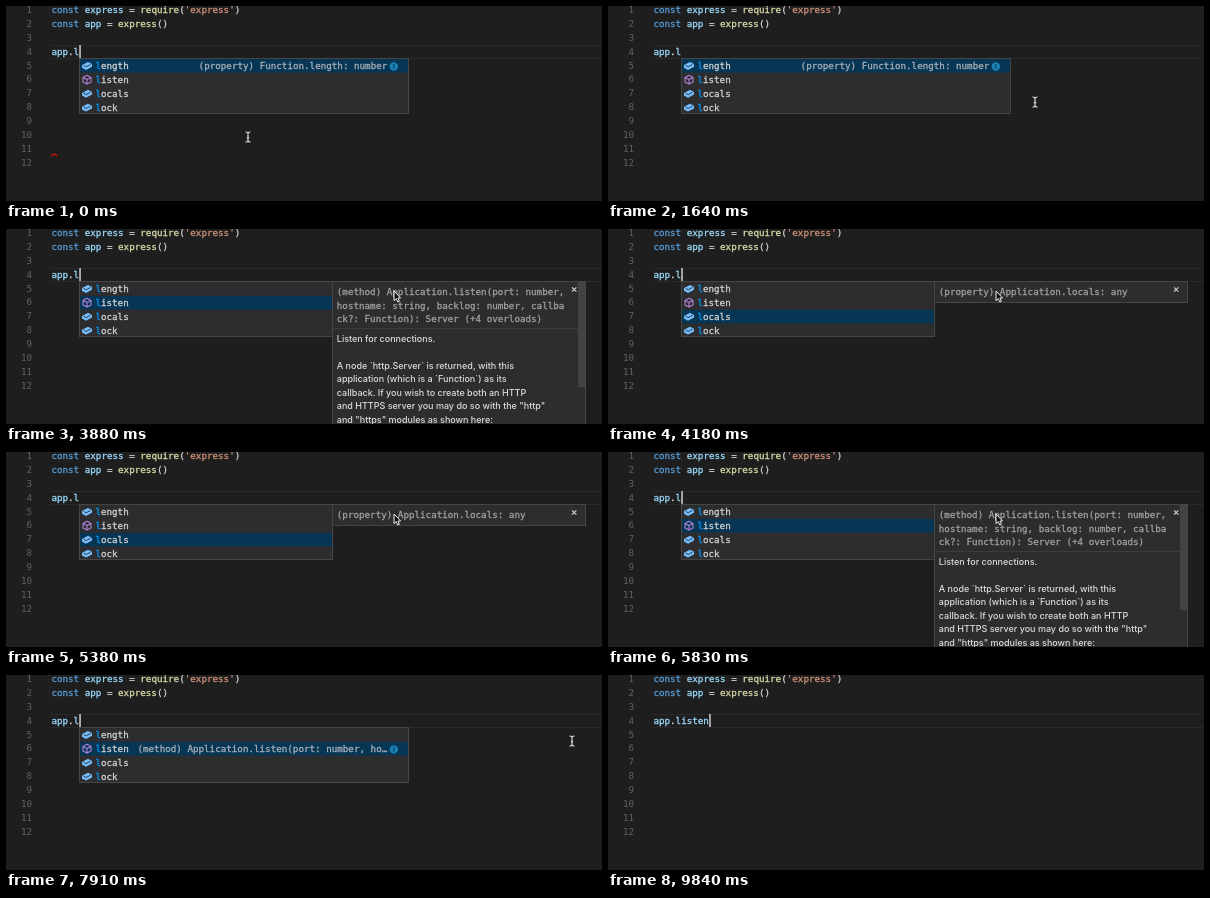
Recreate the animation shown at these times as an HTML page. Size 596 px wide and 195 px high, loop 9980 ms.

```html
<!DOCTYPE html>
<html lang="en">
<head>
<meta charset="utf-8">
<title>Editor suggestions</title>
<style>
  html, body { margin: 0; width: 100%; height: 100%; overflow: hidden; background: #1e1e1e; }
  svg { display: block; }
  text { white-space: pre; }
  .mono { font: 9.23px "DejaVu Sans Mono", monospace; }
  .code { stroke-width: .28px; }
  .sans { font: 500 9px Inter, sans-serif; }
</style>
</head>
<body>
<svg id="stage" width="596" height="195" viewBox="0 0 596 195"></svg>
<script>
const LOOP = 9980, CHAR = 5.556, LINE = 13.85, ROW = 13.9;
const stage = document.getElementById('stage');

const rect = (x, y, w, h, fill, extra = '') =>
  `<rect x="${x}" y="${y}" width="${w}" height="${h}" fill="${fill}" ${extra}/>`;
const path = (d, fill, stroke = 'none', width = 1) =>
  `<path d="${d}" fill="${fill}" stroke="${stroke}" stroke-width="${width}" stroke-linejoin="round"/>`;
const mono = (x, y, str, color) =>
  `<text class="mono code" x="${x}" y="${y}" fill="${color}" stroke="${color}">${str}</text>`;
const sans = (x, y, str) => `<text class="sans" x="${x}" y="${y}" fill="#dcdcdc">${str}</text>`;

// Consecutive [text, color] runs on the character grid.
function runs(x, y, parts) {
  return parts.map(([str, color]) => {
    const out = mono(x, y, str, color);
    x += str.length * CHAR;
    return out;
  }).join('');
}

const blue = '#569cd6', pale = '#9cdcfe', yellow = '#dcdcaa', plain = '#d4d4d4';
const baseline = n => 7.2 + LINE * (n - 1);

const items = [
  { name: 'length', info: '(property) Function.length: number' },
  { name: 'listen', info: '(method) Application.listen(port: number, ho…', method: true },
  { name: 'locals', info: '(property) Application.locals: any' },
  { name: 'lock', info: '(method) Application.lock(path: string)' }
];
const signature = [
  '(method) Application.listen(port: number,',
  'hostname: string, backlog: number, callba',
  'ck?: Function): Server (+4 overloads)'
];
const docs = [
  'A node `http.Server` is returned, with this',
  'application (which is a `Function`) as its',
  'callback. If you wish to create both an HTTP',
  'and HTTPS server you may do so with the "http"',
  'and "https" modules as shown here:'
];

// Caret flips at each of these times, starting visible.
const blinks = [450, 900, 1350, 1940, 2380, 2830, 3430, 3880, 4330, 4930, 5380,
  5830, 6280, 6870, 7310, 7910, 8360, 8810, 9400, 9840];
// [start time, selected row]
const picks = [[0, 0], [600, 1], [1050, 0], [3580, 1], [4180, 2], [4930, 3], [5380, 2], [5830, 1]];
const OPEN = 2530, CLOSE = 7460, ACCEPT = 8360;

const selected = t => picks.filter(p => p[0] <= t).pop()[1];
const caretOn = t => blinks.filter(b => b <= t).length % 2 === 0;
const tick = (t, start) => Math.floor((t - start + 5) / 147);

const approach = [[300, 138], [439, 142], [427, 96], [411, 77], [397, 66], [390, 62], [388, 61], [388, 62]];

function pointer(t) {
  if (t < 1350) return ['beam', 242, 131];
  if (t < OPEN) {
    const [x, y] = approach[Math.min(tick(t, 1350), 7)];
    return [x < 402 && y < 108 && y > 52 ? 'hand' : 'beam', x, y];
  }
  if (t < 6280) return ['arrow', 388, 62];
  if (t < CLOSE) {
    const p = Math.min(tick(t, 6280) / 7, 1), e = p * p * (3 - 2 * p);
    return [p > .9 ? 'hand' : 'arrow', 388 + 178.5 * e, 62];
  }
  if (t < 9110) return ['beam', 566, 66];
  if (t < 9400) return t < 9255 ? ['beam', 540, 105] : ['beam', 500, 167];
  return null;
}

function drawPointer([kind, x, y]) {
  const shape = {
    beam: path('M-2.5-5Q0-5 0-3.5Q0-5 2.5-5M0-4V4M-2.5 5Q0 5 0 3.5Q0 5 2.5 5M-1.2.8H1.2', 'none', '#e8e8e8', 1.1),
    arrow: path('M0 0V9.6L2.2 7.6L3.8 11L5.4 10.2L3.9 7H6.6Z', '#111', '#f0f0f0', 1),
    hand: path('M-1 .4Q0-.6 1 .4V4L4.3 4.9Q5 5.2 4.8 6.5L4 9.3V11.3H-1.4V9.8L-4 6.4Q-3.6 5-2.2 5.7L-1 6.8Z',
      '#f4f4f4', '#222', .7)
  }[kind];
  return `<g transform="translate(${x} ${y})">${shape}</g>`;
}

function icon(method, y) {
  return `<g transform="translate(81 ${y})">` + (method
    ? path('M0-4.3L4-2.2V2.3L0 4.5L-4 2.3V-2.2ZM-4-2.2L0 0L4-2.2M0 0V4.5', 'none', '#b180d7', 1.1)
    : path('M-5-.6L1-3.7L5-1.6V1.1L-1 4.2L-5 2Z', '#75beff') +
      path('M-3.5-.4L-.8 1.1L3.6-1.3', 'none', '#2d2d30', .9)) + '</g>';
}

function editor(t) {
  let out = path('M45 39.5H596M45 52.5H596', 'none', '#292929');
  for (let n = 1; n <= 12; n++)
    out += `<text class="mono" x="26" y="${baseline(n)}" fill="#626262" text-anchor="end">${n}</text>`;
  out += runs(45.4, baseline(1), [['const ', blue], ['express', pale], [' = ', plain],
    ['require', yellow], ['(', plain], ["'express'", '#ce9178'], [')', plain]]);
  out += runs(45.4, baseline(2), [['const ', blue], ['app', pale], [' = ', plain],
    ['express', yellow], ['()', plain]]);
  const done = t >= ACCEPT;
  out += runs(45.4, baseline(4), [['app', pale], ['.', plain], [done ? 'listen' : 'l', pale]]);
  if (t < 150) out += path('M45 150L48.3 147.8L51.5 150', 'none', '#e51400', 1.1);
  if (caretOn(t)) out += rect(done ? 101.2 : 73.3, 39, 1.5, 13, '#d0d0d0');
  return out;
}

function list(row, wide) {
  const right = wide ? 402.5 : 326.5;
  let out = rect(73.5, 52.5, right - 73.5, 55, '#2d2d30', 'stroke="#454545"');
  out += rect(74, 53 + row * ROW, right - 74.5, 13.6, '#073655');
  items.forEach(({ name, info, method }, i) => {
    const y = 59.7 + i * ROW;
    out += icon(method, y);
    out += runs(89.4, y + 3.3, [['l', '#0097fb'], [name.slice(1), plain]]);
    if (wide && i === row) {
      out += mono(381.5 - info.length * CHAR, y + 3.3, info, '#a9b2b9');
      out += `<circle cx="387.8" cy="${y + .8}" r="4.2" fill="#1b80b2"/>` +
        path(`M387.8 ${y - .2}v3M387.8 ${y - 1.8}v1`, 'none', '#0b3350', 1.1);
    }
  });
  return out;
}

function details(row) {
  const full = row === 1;
  let out = rect(326.5, 52.5, 253, full ? 150 : 21, '#2d2d30', 'stroke="#454545"');
  if (full) {
    out += path('M327 99.5H579', 'none', '#3c3c3e');
    out += rect(572, 53, 7, 105, '#434346');
    signature.forEach((s, i) => out += mono(330.8, 66 + i * 13.7, s, '#a2a2a2'));
    out += sans(330.8, 113.3, 'Listen for connections.');
    docs.forEach((s, i) => out += sans(330.8, 140 + i * 13.45, s));
  } else {
    out += mono(330.8, 66, items[row].info, '#a2a2a2');
  }
  return out + path('M566 58.3L570.4 62.7M570.4 58.3L566 62.7', 'none', '#d0d0d0', 1.2);
}

function scene(t) {
  const open = t >= OPEN && t < CLOSE, row = selected(t), mouse = pointer(t);
  return editor(t) +
    (t < ACCEPT ? list(row, !open) : '') +
    (open ? details(row) : '') +
    (mouse ? drawPointer(mouse) : '');
}

let last = '';
function frame() {
  const next = scene(performance.now() % LOOP);
  if (next !== last) stage.innerHTML = last = next;
  requestAnimationFrame(frame);
}
frame();
</script>
</body>
</html>
```
